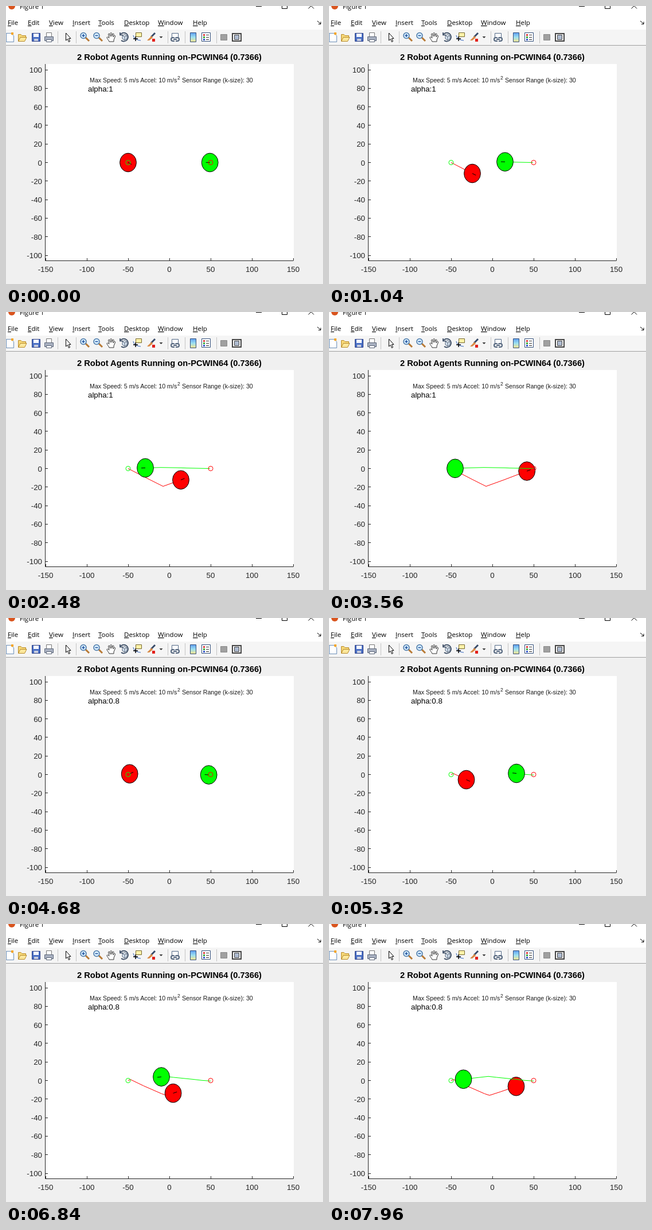
These frames come from a looping animation (553 px wide and 484 px high, 8 s). An HTML page:

```html
<!DOCTYPE html>
<html lang="en">
<head>
<meta charset="utf-8">
<title>Robot agents</title>
<style>
  html, body { margin: 0; width: 100%; height: 100%; overflow: hidden; }
  svg { display: block; width: 553px; height: 484px; background: #f0f0f0; }
  text { font-family: "Liberation Sans", Arial, sans-serif; font-size: 13.33px; white-space: pre; }
  .ui text { font-family: "Open Sans", "Noto Sans", sans-serif; font-size: 11.5px; }
  .ticks { fill: #262626; stroke: none; }
  .line { fill: none; stroke-width: 1; }
</style>
</head>
<body>
<svg viewBox="0 0 553 484">
  <g class="ui">
    <path fill="#fff" d="M0 0H553V41H0Z"/>
    <path fill="#f5f5f5" d="M0 41H553V68H0Z"/>
    <path stroke="#a0a0a0" d="M0 68.5H553"/>
    <circle cx="10" cy="0" r="6" fill="#d9541e"/>
    <text x="24" y="5">Figure 1</text>
    <path class="line" stroke="#000" d="M436 .5H446M481.500-5V4.500H490.500V-5M527.500 4.500L537-5M527.500-5L537 4.500"/>
    <g id="menu"></g>
    <path class="line" stroke="#000" d="M543 26L549 31M549 27.500V31.500H545"/>
  </g>

  <g id="tools" stroke-width="1">
    <path stroke="#c4c4c4" d="M90.500 44V65M122.500 44V65M282.500 44V65M312.500 44V65M367.500 44V65"/>
    <path fill="#fff" stroke="#6c8fb8" d="M.500 47.500H9L13.500 52V62.500H.500Z"/>
    <path fill="#f5a623" d="M9 46h4v4h-4z"/>
    <path fill="#f6d878" stroke="#b88a2a" d="M21.500 61.500V49.500H26L28 51.500H34.500V54.500"/>
    <path fill="#fbe79c" stroke="#b88a2a" d="M21.500 61.500L25 54.500H36L32.500 61.500Z"/>
    <path fill="#4a6fc4" stroke="#2c3f86" d="M45.500 47.500H59.500V61.500H45.500Z"/>
    <path fill="#f4f7ff" d="M48 48H57V54H48Z"/>
    <path fill="#c9cfe0" d="M49 57H56V61H49Z"/>
    <path fill="#fff" stroke="#777" d="M70.500 54V46.500H79.500V54"/>
    <path fill="#aab2c2" stroke="#5b6578" d="M67.500 53.500H82.500V60.500H67.500Z"/>
    <path fill="#fff" stroke="#5b6578" d="M70.500 58.500H79.500V62.500H70.500Z"/>
    <path fill="#fff" stroke="#000" d="M104.500 47V60L107.500 57.500L109.500 62.500L111.500 61.500L109.500 56.500H113Z"/>
    <g id="lens">
      <path stroke="#b87a35" stroke-width="3" d="M139 55L145 61"/>
      <circle cx="135" cy="51.500" r="5" fill="#d9efff" stroke="#4a78a8" stroke-width="1.500"/>
      <path stroke="#1c4f9c" stroke-width="1.500" d="M132.500 51.500H137.500"/>
    </g>
    <use href="#lens" x="23"/>
    <path stroke="#1c4f9c" stroke-width="1.500" d="M135 49V54"/>
    <path fill="#fff" stroke="#333" d="M180 62C179 59 175.500 56 176 54.500C177 53 179 55 180 56L178.500 49C179 47.500 180.500 48 181 49.500L182 53V47.500C182.500 46 184 46 184.500 47.500V53L186 48.500C187 47.500 188.500 48 188 50L187 54L189 51.500C190 51 191 52 190.500 53L188 59V62Z"/>
    <path fill="#dce8f4" stroke="#54657b" d="M203 51.500L207 49.500L211 51.500V57L207 59.500L203 57ZM203 51.500L207 53.500L211 51.500M207 53.500V59.500"/>
    <path class="line" style="stroke-width:1.700" stroke="#34465f" d="M200 49A7.500 7.500 0 1 1 201 60M199 46V50.500H204"/>
    <path fill="#fff2a8" stroke="#776a30" d="M226.500 46.500H236.500V53.500H226.500Z"/>
    <path class="line" stroke="#2c62bd" d="M222 51C223 57 227 59 235 60"/>
    <path stroke="#000" stroke-width="1.500" d="M222 57H230M226 53V61"/>
    <path stroke="#384b69" stroke-width="3" d="M260 47L253 54"/>
    <path fill="#d88944" d="M254 52L256 55L250 60L246 60Z"/>
    <path fill="#e3211c" d="M255 57h5v5h-5z"/>
    <path fill="#333" d="M267.500 53H273.500L270.500 56Z"/>
    <path fill="#fff" stroke="#536987" d="M289.500 47.500H300.500V55.500H289.500Z"/>
    <path class="line" style="stroke-width:2" stroke="#53657d" d="M293 55H291Q288 55 288 58T291 61H294M296 55H299Q302 55 302 58T299 61H296M292 58H298"/>
    <linearGradient id="bar" x2="0" y2="1"><stop stop-color="#5f9ef0"/><stop offset=".5" stop-color="#9ce0f0"/><stop offset="1" stop-color="#f8e58a"/></linearGradient>
    <path fill="url(#bar)" stroke="#34507c" d="M321.500 46.500H331.500V62.500H321.500Z"/>
    <path fill="#fff" stroke="#34507c" d="M341.500 46.500H356.500V61.500H341.500Z"/>
    <path stroke="#333" d="M349 50.500H354M349 54.500H354M349 58.500H354"/>
    <path fill="#d33" d="M344 49h3v3h-3z"/><path fill="#3a3" d="M344 53h3v3h-3z"/><path fill="#35c" d="M344 57h3v3h-3z"/>
    <path fill="#a0a0a0" stroke="#8a8a8a" d="M374.500 49.500H385.500V59.500H374.500Z"/>
    <path fill="#fff" stroke="#444" stroke-width="2" d="M395 48H410V61H395Z"/>
    <path fill="#aebbd0" stroke="#444" d="M398.500 50.500H406.500V58.500H398.500Z"/>
  </g>

  <path fill="#fff" d="M69 101H502V443H69Z"/>
  <text x="285" y="94" text-anchor="middle" font-weight="bold" style="font-size:14.67px">2 Robot Agents Running on-PCWIN64 (0.7366)</text>
  <text x="146" y="133" style="font-size:10.67px" fill="#1a1a1a">Max Speed: 5 m/s Accel: 10 m/s</text>
  <text x="299" y="128" style="font-size:8.5px" fill="#1a1a1a">2</text>
  <text x="307" y="133" style="font-size:10.67px" fill="#1a1a1a">Sensor Range (k-size): 30</text>
  <text x="143" y="149" id="alpha"></text>
  <path id="axes" class="line" stroke="#262626"/>
  <g id="labels" class="ticks"></g>
  <g id="agents"></g>
  <circle class="line" cx="213" cy="272.500" r="4" stroke="#0f0"/>
  <circle class="line" cx="357" cy="272.500" r="4" stroke="#f00"/>
</svg>
<script>
const $ = id => document.getElementById(id);

function add(parent, tag, attrs, text = "") {
  const node = document.createElementNS("http://www.w3.org/2000/svg", tag);
  for (const name in attrs) node.setAttribute(name, attrs[name]);
  node.textContent = text;
  return parent.appendChild(node);
}

const menu = { File: 3, Edit: 38, View: 75, Insert: 116, Tools: 161, Desktop: 206, Window: 265, Help: 326 };
for (const name in menu) {
  const item = add($("menu"), "text", { x: menu[name], y: 33 });
  add(item, "tspan", { "text-decoration": "underline" }, name[0]);
  item.append(name.slice(1));
}

let axes = "M68.5 101V443.5H501.5";
for (let v = -150; v <= 150; v += 50) {
  const x = 285 + v * 1.44;
  axes += `M${Math.floor(x) + .5} 443V439`;
  add($("labels"), "text", { x, y: 463, "text-anchor": "middle" }, v);
}
for (let v = -100; v <= 100; v += 20) {
  const y = 272.5 - v * 1.615;
  axes += `M69 ${Math.floor(y) + .5}H73`;
  add($("labels"), "text", { x: 63, y: y + 5, "text-anchor": "end" }, v);
}
$("axes").setAttribute("d", axes);

// Waypoints are [ms, x, y]; agents stop at the last one.
const runs = [
  { start: 0, alpha: "1", paths: [
    [[0, 213, 272.5], [1040, 250, 291.5], [1710, 274, 303.5], [2480, 305, 292.3], [3360, 338.5, 279.5], [3720, 350.5, 275]],
    [[0, 355.7, 272.5], [840, 315, 271.7], [1040, 307, 271.3], [1880, 270, 270.7], [2480, 243, 271.4], [2985, 220, 272.3]]
  ] },
  { start: 4600, alpha: "0.8", paths: [
    [[4600, 213, 272.5], [4720, 217, 270.7], [5320, 239.5, 281.5], [6240, 271.5, 295.5], [6490, 280, 298.3], [7080, 299.5, 292], [7960, 326.5, 282.7]],
    [[4600, 357, 273.3], [4960, 342, 272.3], [5320, 327, 270.5], [6240, 292.5, 267], [6630, 278, 265.3], [7080, 263, 267], [7960, 234.5, 270.2]]
  ] }
];

const agents = ["#f00", "#0f0"].map(color => ({
  trail: add($("agents"), "path", { class: "line", stroke: color }),
  body: add($("agents"), "ellipse", { rx: 14.4, ry: 16.3, fill: color, stroke: "#000" }),
  heading: add($("agents"), "path", { class: "line", stroke: "#000" })
}));

function place({ trail, body, heading }, path, t) {
  const next = path.findIndex(p => p[0] > t);
  const i = next < 0 ? path.length - 1 : next;
  const [t0, x0, y0] = path[i - 1], [t1, x1, y1] = path[i];
  const k = Math.min(1, (t - t0) / (t1 - t0));
  const dx = x1 - x0, dy = y1 - y0, step = 7 / Math.hypot(dx, dy);
  const x = x0 + dx * k, y = y0 + dy * k;
  const points = path.slice(0, i).map(p => p.slice(1));
  trail.setAttribute("d", "M" + [...points, [x, y]].join("L"));
  body.setAttribute("cx", x);
  body.setAttribute("cy", y);
  heading.setAttribute("d", next < 0 ? "" : `M${x} ${y}l${dx * step} ${dy * step}`);
}

function draw(now) {
  const t = Math.floor(now % 8000 / 40) * 40;
  const run = runs[t < runs[1].start ? 0 : 1];
  $("alpha").textContent = "alpha:" + run.alpha;
  agents.forEach((agent, i) => place(agent, run.paths[i], t));
  requestAnimationFrame(draw);
}
draw(0);
</script>
</body>
</html>
```
